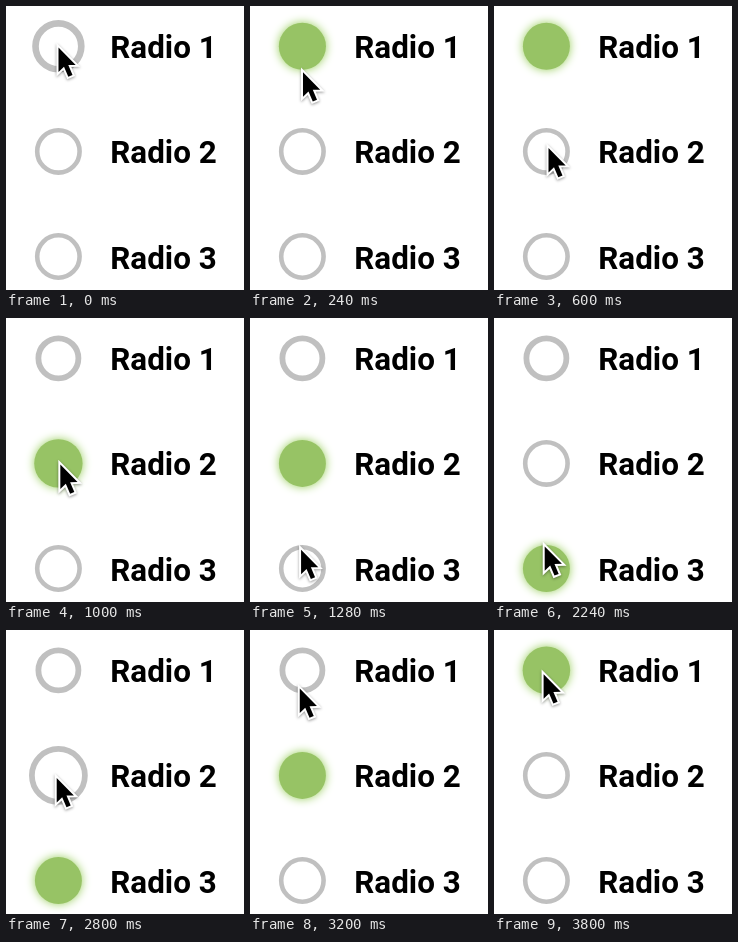
Write an HTML page with a canvas that moves like this. It is 238 by 284 pixels and loops after 3.92 s.

```html
<!DOCTYPE html>
<html lang="en">
<head>
<meta charset="utf-8">
<title>Radio buttons</title>
<style>
html, body { margin: 0; width: 100%; height: 100%; overflow: hidden; background: #fff; }
canvas { display: block; width: 238px; height: 284px; }
</style>
</head>
<body>
<canvas id="stage"></canvas>
<script>
const W = 238, H = 284, LOOP = 3920, STEP = 40;
const GRAY = '#c0c0c0', GREEN = '#97c365';
const CX = 52.4, TOP = 40.3, GAP = 105.1, DOT = 23.5;

const canvas = document.getElementById('stage');
const ctx = canvas.getContext('2d');
const dpr = window.devicePixelRatio || 1;
canvas.width = W * dpr;
canvas.height = H * dpr;

// The first ring is drawn a little heavier than the others.
const radios = [5.8, 4.6, 4.6].map((line, i) => ({ line, y: TOP + GAP * i }));

const clicks = [
  { at: -30, radio: 0 }, { at: 880, radio: 1 }, { at: 1675, radio: 2 },
  { at: 2800, radio: 1 }, { at: 3625, radio: 0 }
];

const home = { x: 52.5, y: 41.5 };
const moves = [
  { from: 40, to: 600, x: 54.5, y: 142 },
  { from: 910, to: 1400, x: 50.7, y: 241.5 },
  { from: 2130, to: 2520, x: 50.7, y: 148 },
  { from: 2840, to: 3340, x: 49.6, y: 44.3 }
];

const arrow = new Path2D('M0 0V24.4L5.5 19.2L9.8 29.2L14 27.5L9.8 17.6L17.2 17.4Z');

const ramp = (v, a, b) => Math.min(1, Math.max(0, (v - a) / (b - a)));
const ease = u => u * u * u * (u * (6 * u - 15) + 10);
const pop = age => 1 + 0.25 * Math.exp(-age / 55);

function pointerAt(t) {
  let { x, y } = home;
  for (const m of moves) {
    const k = ease(ramp(t, m.from, m.to));
    x += (m.x - x) * k;
    y += (m.y - y) * k;
  }
  return [x, y];
}

function disc(y, r) {
  ctx.beginPath();
  ctx.arc(CX, y, r, 0, Math.PI * 2);
}

function ring({ y, line }, scale = 1, alpha = 1) {
  ctx.globalAlpha = alpha;
  ctx.strokeStyle = GRAY;
  ctx.lineWidth = line * scale;
  disc(y, (25.8 - line) * scale);
  ctx.stroke();
  ctx.globalAlpha = 1;
}

function dot({ y }, r, glow) {
  if (r <= 0) return;
  ctx.save();
  ctx.fillStyle = GREEN;
  ctx.shadowColor = `rgba(151, 205, 90, ${glow})`;
  ctx.shadowBlur = 10 * dpr;
  disc(y, r);
  ctx.fill();
  ctx.restore();
}

function turnOn(radio, age) {
  const fill = ramp(age, 50, 110);
  if (fill < 1) ring(radio, pop(age));
  dot(radio, DOT * fill * pop(age), ramp(age, 50, 120));
}

function turnOff(radio, age) {
  const left = 1 - ramp(age, 0, 145);
  ring(radio, 1, ramp(age, 60, 110));
  if (age < 110) dot(radio, DOT * left, left);
}

function drawPointer(x, y) {
  ctx.save();
  ctx.translate(x, y);
  ctx.lineWidth = 4;
  ctx.strokeStyle = '#fff';
  ctx.shadowColor = 'rgba(0, 0, 0, 0.4)';
  ctx.shadowBlur = 3 * dpr;
  ctx.shadowOffsetY = dpr;
  ctx.stroke(arrow);
  ctx.shadowColor = 'transparent';
  ctx.fillStyle = '#000';
  ctx.fill(arrow);
  ctx.restore();
}

function draw(t) {
  ctx.setTransform(dpr, 0, 0, dpr, 0, 0);
  ctx.fillStyle = '#fff';
  ctx.fillRect(0, 0, W, H);

  const past = clicks.filter(c => c.at <= t);
  const now = past.pop(), before = past.pop();
  const age = t - now.at;

  ctx.font = '700 31.4px Roboto, sans-serif';
  radios.forEach((radio, i) => {
    if (i === now.radio) turnOn(radio, age);
    else if (before && i === before.radio) turnOff(radio, age);
    else ring(radio);
    ctx.fillStyle = '#000';
    ctx.fillText(`Radio ${i + 1}`, 104.3, radio.y + 12);
  });
  drawPointer(...pointerAt(t));
}

function tick() {
  const t = performance.now() % LOOP;
  draw(Math.floor(t / STEP) * STEP);
  requestAnimationFrame(tick);
}
tick();
</script>
</body>
</html>
```
